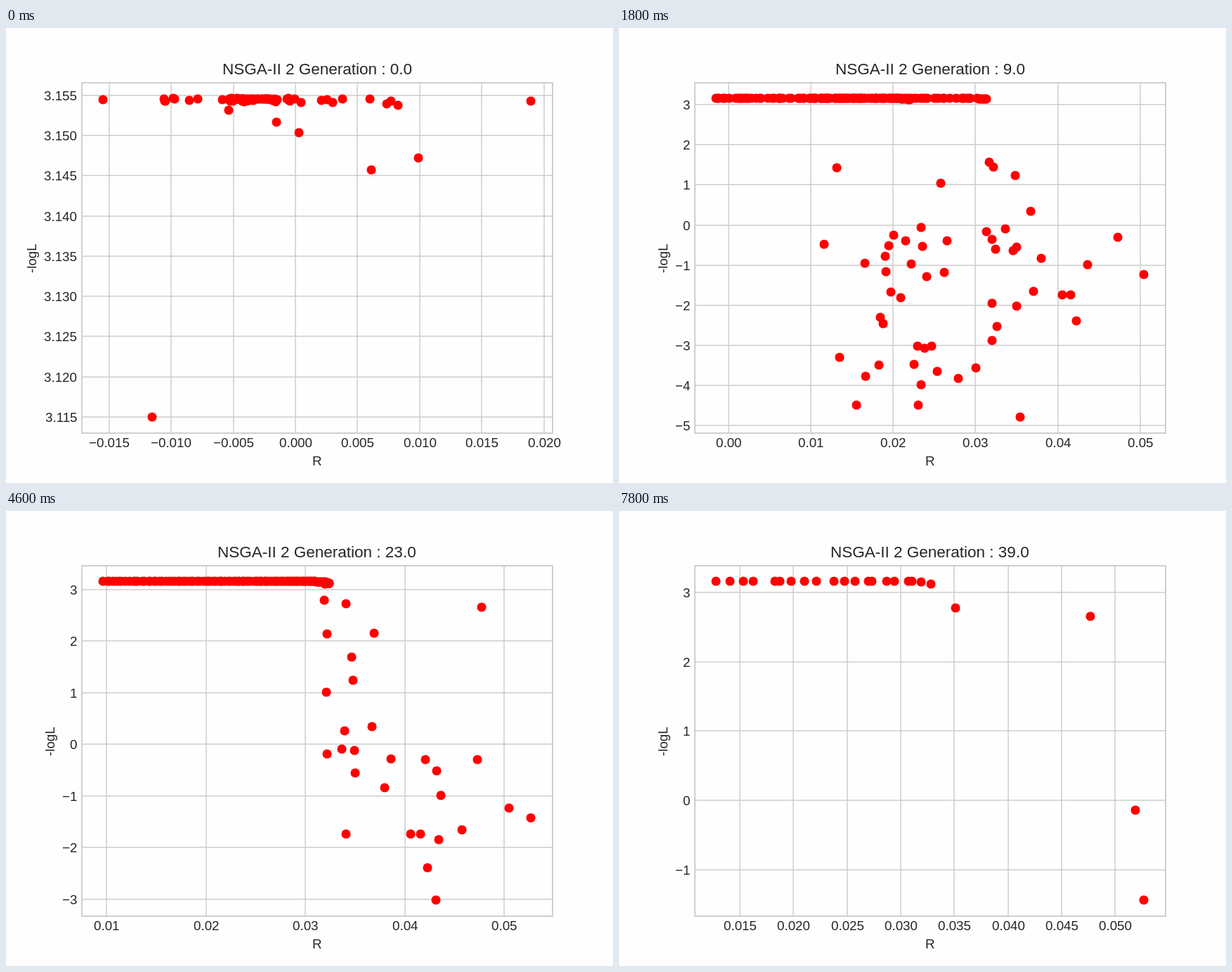
Animation of 864x648 px, one loop 8000 ms. Source, as an HTML page with a canvas:

```html
<!DOCTYPE html>
<html lang="en">
<head>
<meta charset="utf-8">
<title>Pareto front by generation</title>
<style>
  html, body { margin: 0; width: 100%; height: 100%; overflow: hidden; background: #fefefe; }
  canvas { display: block; }
</style>
</head>
<body>
<canvas id="stage" width="864" height="648"></canvas>
<script>
const ctx = document.getElementById('stage').getContext('2d');
const STEP_MS = 200, GENERATIONS = 40;
const BOX = { left: 108, top: 77.76, right: 777.6, bottom: 576.72 };
const BOX_W = BOX.right - BOX.left, BOX_H = BOX.bottom - BOX.top;
const MARGIN = 0.05, MAX_BINS = 9, DOT_R = 6.56;
const PAPER = '#fefefe', INK = '#262626', GRID = '#cccccc', RED = '#ff0000';
const FONT = '"Liberation Sans", Arial, sans-serif';

// The population is described at these generations; dots come and go in between.
const STAGES = [0, 5, 13, 18, 23, 28, 39, GENERATIONS];
const LIMIT = 3.1546;   // upper bound of -logL
const WALL = 0.0319;    // R where the front drops off

let seed = 11;
function random() {
  seed = (seed * 1664525 + 1013904223) % 4294967296;
  return seed / 4294967296;
}
const uniform = (lo, hi) => lo + (hi - lo) * random();
const exponential = mean => -mean * Math.log(1 - random());
const gaussian = (mean, sd) =>
  mean + sd * Math.sqrt(-2 * Math.log(1 - random())) * Math.cos(2 * Math.PI * random());
const clamp = (v, lo, hi) => Math.min(hi, Math.max(lo, v));

// A random generation after stage i, up to and including stage i + 1.
function between(i) {
  return STAGES[i] + 1 + Math.floor(random() * (STAGES[i + 1] - STAGES[i]));
}

const points = [];

// A dot present from stage `first` through stage `last`.
function add(first, last, x, y) {
  points.push({ x, y, born: first ? between(first - 1) : 0, dies: between(last) });
}

function keep(first, last, ...spots) {
  for (const [x, y] of spots) add(first, last, x, y);
}

function scatter(stage, count, place) {
  for (let i = 0; i < count; i++) add(stage, stage, ...place());
}

// Dots along the upper limit, denser to the right for skew > 1, sagging at the right end.
function row(stage, from, to, count, skew) {
  for (let i = 0; i < count; i++) {
    const inner = i > 0 && i < count - 1;
    const r = (i + (inner ? uniform(-0.5, 0.5) : 0)) / (count - 1);
    const t = 1 - r ** skew;
    add(stage, stage, from + (to - from) * t, LIMIT - 0.035 * t ** 60);
  }
}

// First population: a flat band with a few stray dots
scatter(0, 60, () => [uniform(-0.0055, -0.0005), LIMIT - exponential(0.00008)]);
scatter(0, 24, () => [uniform(-0.011, 0.0095), LIMIT - exponential(0.0003)]);
keep(0, 0, [-0.01547, 3.1545], [0.01895, 3.1543], [-0.01155, 3.115], [0.00992, 3.1472],
  [0.00608, 3.1457], [0.0003, 3.1504], [-0.0015, 3.1517]);

// Exploration: a wide cloud under the limit
row(1, -0.00153, 0.022, 150, 1);
row(1, 0.0239, 0.0253, 4, 1);
scatter(1, 80, () => {
  const y = clamp(gaussian(-1, 2), -4.5, 2.8);
  return [clamp(gaussian(0.0212 - 0.0006 * y, 0.0046), 0.011, 0.034), y];
});

// The front closes in on the wall
row(2, 0.00983, 0.0316, 120, 1.2);
row(3, 0.00918, 0.0325, 100, 1.3);
row(4, 0.00967, 0.0324, 110, 1.6);
row(5, 0.01628, 0.0328, 45, 1.4);
row(6, 0.0128, 0.0328, 20, 1.2);
for (const [stage, onWall, behind, floor] of [[2, 9, 18, -3.3], [3, 3, 6, -1.8], [4, 4, 3, -1.8]]) {
  scatter(stage, onWall, () => [WALL + uniform(-0.0003, 0.0003), 3.1 - 2.3 * random() ** 2]);
  scatter(stage, behind, () => [WALL + clamp(exponential(0.0025), 0, 0.008), uniform(floor, 0)]);
}

// Long-lived dots and those that set the axis bounds
keep(1, 2, [0.03544, -4.79]);
keep(1, 4, [0.04228, -2.39], [0.04156, -1.745]);
keep(1, 5, [0.05048, -1.23], [0.04731, -0.3], [0.03483, 1.24]);
keep(2, 3, [0.04092, -2.635]);
keep(2, 4, [0.03364, -0.09], [0.03504, -0.555], [0.03798, -0.835], [0.04573, -1.66], [0.04056, -1.745]);
keep(2, 5, [0.03689, 2.157], [0.03671, 0.345], [0.03863, -0.28], [0.04366, -0.985]);
keep(2, 6, [0.04771, 2.655]);
keep(3, 4, [0.03394, 0.258], [0.0434, -1.845]);
keep(3, 5, [0.03464, 1.687], [0.04208, -0.295]);
keep(3, 6, [0.05269, -1.433]);
keep(4, 4, [0.04317, -3.02]);
keep(4, 5, [0.03407, 2.73], [0.04318, -0.51]);
keep(5, 5, [0.03854, 2.514]);
keep(6, 6, [0.03509, 2.775], [0.0519, -0.137]);

function extent(values) {
  const lo = Math.min(...values), hi = Math.max(...values);
  const pad = (hi - lo) * MARGIN;
  return [lo - pad, hi + pad];
}

function ticks([lo, hi]) {
  const span = hi - lo;
  const exp = Math.floor(Math.log10(span / MAX_BINS));
  const mant = [1, 2, 2.5, 5, 10].find(m => span / (m * 10 ** exp) <= MAX_BINS);
  const step = mant * 10 ** exp;
  const digits = Math.max(0, -exp + (mant === 2.5 ? 1 : mant === 10 ? -1 : 0));
  const out = [];
  for (let i = Math.ceil(lo / step); i * step <= hi; i++) {
    out.push({ value: i * step, label: (i * step).toFixed(digits).replace('-', '\u2212') });
  }
  return out;
}

// Draws text from a whole pixel; `align` is the share of its width left of x.
function text(str, x, y, align, size = 18.75) {
  ctx.font = `${size}px ${FONT}`;
  const width = ctx.measureText(str).width;
  ctx.fillText(str, Math.round(x - width * align), Math.round(y));
  return width;
}

function line(x0, y0, x1, y1) {
  ctx.beginPath();
  ctx.moveTo(x0, y0);
  ctx.lineTo(x1, y1);
  ctx.stroke();
}

function draw(gen) {
  const alive = points.filter(p => p.born <= gen && gen < p.dies);
  const xLim = extent(alive.map(p => p.x)), yLim = extent(alive.map(p => p.y));
  const toX = x => Math.round(BOX.left + (x - xLim[0]) / (xLim[1] - xLim[0]) * BOX_W);
  const toY = y => Math.round(BOX.bottom - (y - yLim[0]) / (yLim[1] - yLim[0]) * BOX_H);
  const xMid = (BOX.left + BOX.right) / 2, yMid = (BOX.top + BOX.bottom) / 2;

  ctx.fillStyle = PAPER;
  ctx.fillRect(0, 0, 864, 648);
  ctx.strokeStyle = GRID;
  ctx.fillStyle = INK;
  ctx.lineWidth = 1.5;

  for (const t of ticks(xLim)) {
    const x = toX(t.value);
    line(x, BOX.top, x, BOX.bottom);
    text(t.label, x, 597, 0.5);
  }
  let widest = 0;
  for (const t of ticks(yLim)) {
    const y = toY(t.value);
    line(BOX.left, y, BOX.right, y);
    widest = Math.max(widest, text(t.label, 101.4, y + 6.5, 1));
  }

  text('R', xMid, 623, 0.5);
  text(`NSGA-II 2 Generation : ${gen}.0`, xMid, 66, 0.5, 22.5);
  ctx.save();
  ctx.translate(Math.round(90 - widest), Math.round(yMid + 0.8));
  ctx.rotate(-Math.PI / 2);
  text('-logL', 0, 0, 0.5);
  ctx.restore();

  ctx.lineWidth = 1.875;
  ctx.strokeRect(108, 78, 670, 499);

  ctx.fillStyle = RED;
  for (const p of alive) {
    ctx.beginPath();
    ctx.arc(toX(p.x), toY(p.y), DOT_R, 0, Math.PI * 2);
    ctx.fill();
  }
}

const start = performance.now();
let shown = -1;
function tick() {
  const gen = Math.floor((performance.now() - start) / STEP_MS) % GENERATIONS;
  if (gen !== shown) draw(shown = gen);
  requestAnimationFrame(tick);
}
tick();
</script>
</body>
</html>
```
